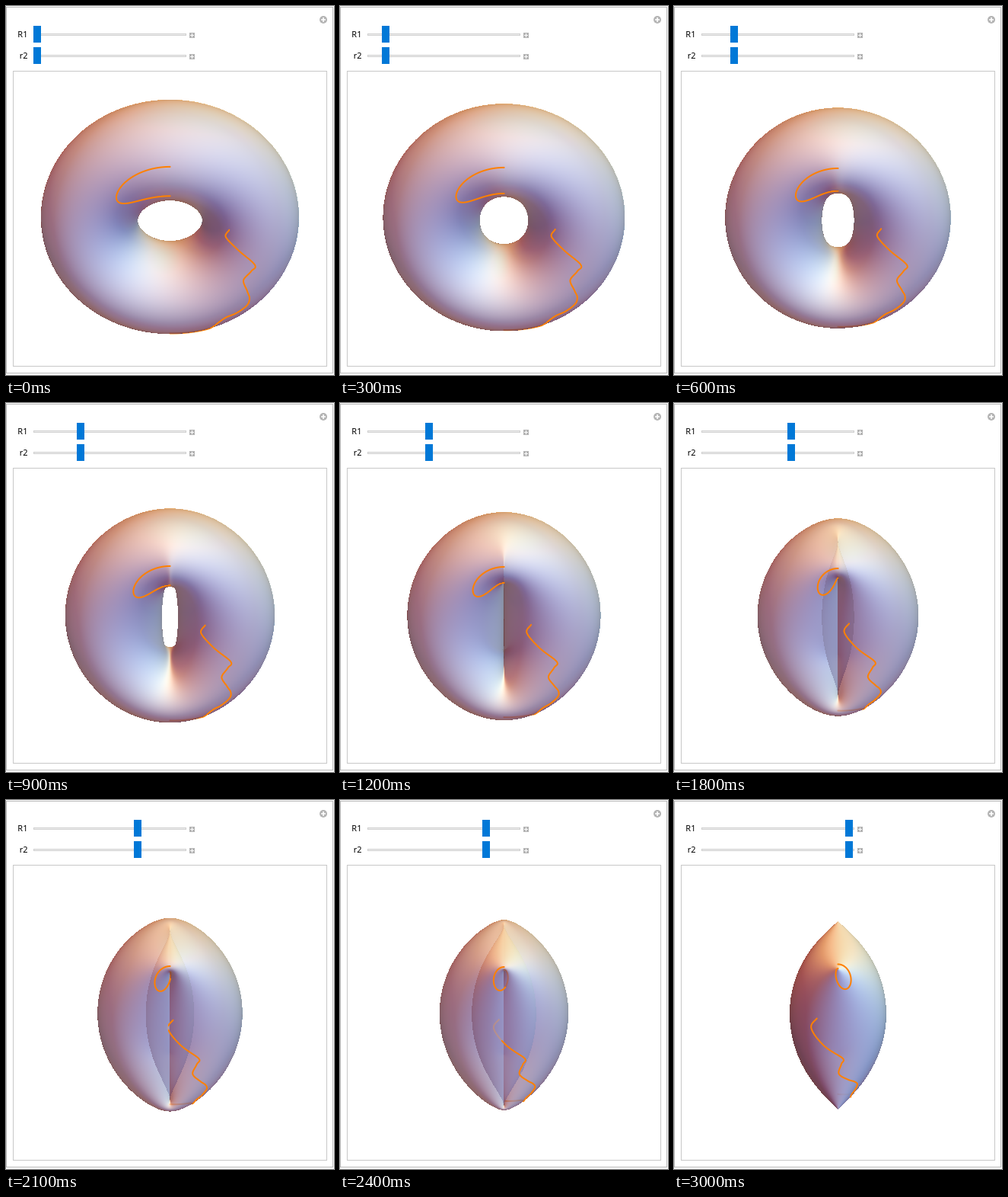
These frames come from a looping animation (431 px wide and 484 px high, 4 s). An HTML page with a canvas:

```html
<!DOCTYPE html>
<html lang="en">
<head>
<meta charset="utf-8">
<title>Torus deformation</title>
<style>
  html, body { margin: 0; width: 100%; height: 100%; overflow: hidden; background: #fff; }
  canvas, svg { position: absolute; left: 0; top: 0; }
  text { font: 11px "Noto Sans", "Open Sans", sans-serif; text-anchor: end; }
</style>
</head>
<body>
<canvas id="view" width="431" height="484"></canvas>
<svg width="431" height="484" shape-rendering="crispEdges">
  <defs>
    <g id="row">
      <rect x="36.5" y="36.5" width="200" height="2" fill="#eee" stroke="#d0d0d0"/>
      <rect x="241" y="35" width="7" height="7" fill="#b4b4b4"/>
      <path d="M242 38.5h5M244.5 36v5" stroke="#fff"/>
    </g>
  </defs>
  <rect x=".5" y="1.5" width="429" height="480" fill="none" stroke="#b8b8b8"/>
  <rect x="9.5" y="85.5" width="412" height="387" fill="none" stroke="#c8c8c8"/>
  <circle cx="417" cy="18" r="5" fill="#b4b4b4" shape-rendering="auto"/>
  <path d="M414 18h6M417 15v6" stroke="#fff" stroke-width="1.6" shape-rendering="auto"/>
  <use href="#row"/>
  <use href="#row" y="28"/>
  <text x="28.5" y="41">R1</text>
  <text x="28.5" y="69">r2</text>
  <g id="thumbs" fill="#0078d7">
    <rect x="36" y="26" width="10" height="22"/>
    <rect x="36" y="54" width="10" height="22"/>
  </g>
</svg>
<script>
const W = 431, H = 484, CX = 215.47, CY = 282.6, DIST = 1411;
const SIN = 0.85, COS = 0.527, RING = 105.6, TUBE = 63.4;
const STEPS = 10, STEP_MS = 300, LOOP_MS = 4000;
const OPACITY = 0.7, ORANGE = [255, 128, 0], RAD = Math.PI / 180;
const ctx = document.getElementById('view').getContext('2d');
const thumbs = document.getElementById('thumbs');

const unit = v => {
  const n = Math.hypot(...v) || 1;
  return v.map(c => c / n);
};
const AMBIENT = [0.4, 0.2, 0.2];
const LIGHTS = [
  [[2, 0, 2], [0, 0.18, 0.5]],
  [[2, 2, 3], [0.18, 0.5, 0.18]],
  [[0, 2, 2], [0.5, 0.18, 0]],
  [[0, 0, 2], [0, 0, 0.18]]
].map(([dir, color]) => [unit(dir), color]);

// Model axes to screen right, up and towards the viewer
const turn = ([x, y, z]) => [x, y * SIN - z * COS, y * COS + z * SIN];

function shade(normal) {
  const n = unit(turn(normal)), flip = n[2] < 0 ? -1 : 1;
  const rgb = AMBIENT.slice();
  for (const [d, color] of LIGHTS) {
    const dot = flip * (n[0] * d[0] + n[1] * d[1] + n[2] * d[2]);
    if (dot > 0) color.forEach((c, i) => rgb[i] += c * dot);
  }
  return rgb.map(c => 255 * Math.min(1, c));
}

// Both the ring's half width and the tube's depth shrink to zero
function surface(k) {
  const R1 = RING * (1 - k / STEPS), r2 = TUBE * (1 - k / STEPS);
  return (u, v, lit) => {
    const cu = Math.cos(u), su = Math.sin(u), cv = Math.cos(v), sv = Math.sin(v);
    const a = R1 + TUBE * cv, b = RING + r2 * cv;
    const [x, y, depth] = turn([a * cu, b * su, TUBE * sv]);
    const s = DIST / (DIST - depth);
    const p = { x: CX + x * s, y: CY - y * s, s };
    if (lit) p.rgb = shade([b * cu * TUBE * cv, a * su * TUBE * cv, sv * (a * su * r2 * su + b * cu * TUBE * cu)]);
    return p;
  };
}

function spline(pts, t) {
  const f = t * (pts.length - 1), i = Math.min(pts.length - 2, Math.floor(f)), q = f - i;
  const at = j => pts[Math.max(0, Math.min(pts.length - 1, j))];
  return [0, 1].map(c => {
    const [a, b, d, e] = [-1, 0, 1, 2].map(o => at(i + o)[c]);
    return b + q / 2 * (d - a + q * (2 * a - 5 * b + 4 * d - e + q * (3 * (b - d) + e - a)));
  });
}
const WAVE = [[17, 116], [8, 122.6], [-3.6, 107], [-13.7, 84.5], [-19, 86], [-27.8, 88.7],
  [-34.2, 75.7], [-38.4, 64.5], [-43.9, 56.3], [-51.3, 56], [-57, 59.8], [-62.5, 55.6],
  [-67.4, 46], [-71, 37], [-80, 31], [-90, 28]];
const CURVES = [
  t => [90 + 43.7 * Math.sin(Math.PI * t), 102.7 - 22.4 * Math.cos(Math.PI * t)],
  t => spline(WAVE, t)
];

function fillTriangle(layers, a, b, c) {
  const area = (b.x - a.x) * (c.y - a.y) - (b.y - a.y) * (c.x - a.x);
  if (!area) return;
  const x0 = Math.ceil(Math.min(a.x, b.x, c.x) - 0.5), x1 = Math.max(a.x, b.x, c.x);
  const y0 = Math.ceil(Math.min(a.y, b.y, c.y) - 0.5), y1 = Math.max(a.y, b.y, c.y);
  for (let j = y0; j + 0.5 < y1; j++) {
    for (let i = x0; i + 0.5 < x1; i++) {
      const px = i + 0.5, py = j + 0.5;
      const wa = ((b.x - px) * (c.y - py) - (b.y - py) * (c.x - px)) / area;
      const wb = ((c.x - px) * (a.y - py) - (c.y - py) * (a.x - px)) / area;
      const wc = 1 - wa - wb;
      if (wa < 0 || wb < 0 || wc < 0) continue;
      (layers[j * W + i] ||= []).push({
        s: wa * a.s + wb * b.s + wc * c.s,
        alpha: OPACITY,
        rgb: a.rgb.map((v, n) => wa * v + wb * b.rgb[n] + wc * c.rgb[n])
      });
    }
  }
}

function addCurve(layers, point, curve) {
  const marks = new Map(), N = 900;
  for (let n = 0; n <= N; n++) {
    const [u, v] = curve(n / N), p = point(u * RAD, v * RAD);
    for (let j = Math.floor(p.y) - 2; j <= p.y + 2; j++) {
      for (let i = Math.floor(p.x) - 2; i <= p.x + 2; i++) {
        const alpha = Math.min(1, 1.5 - Math.hypot(i + 0.5 - p.x, j + 0.5 - p.y));
        const key = j * W + i, old = marks.get(key);
        if (alpha > 0 && (!old || alpha > old.alpha)) marks.set(key, { s: p.s + 0.002, alpha, rgb: ORANGE });
      }
    }
  }
  marks.forEach((m, key) => (layers[key] ||= []).push(m));
}

function render(k) {
  const NU = 240, NV = 120, point = surface(k), layers = new Array(W * H);
  const grid = [];
  for (let i = 0; i <= NU; i++) {
    grid.push(Array.from({ length: NV + 1 }, (_, j) => point(i / NU * 2 * Math.PI, j / NV * 2 * Math.PI, true)));
  }
  for (let i = 0; i < NU; i++) {
    for (let j = 0; j < NV; j++) {
      const a = grid[i][j], b = grid[i + 1][j], c = grid[i + 1][j + 1], d = grid[i][j + 1];
      fillTriangle(layers, a, b, c);
      fillTriangle(layers, a, c, d);
    }
  }
  CURVES.forEach(curve => addCurve(layers, point, curve));

  const img = ctx.createImageData(W, H);
  img.data.fill(255);
  layers.forEach((list, key) => {
    const rgb = [255, 255, 255];
    list.sort((p, q) => p.s - q.s);
    for (const l of list) l.rgb.forEach((v, n) => rgb[n] += (v - rgb[n]) * l.alpha);
    img.data.set(rgb, key * 4);
  });
  return img;
}

const cache = [];
let shown = -1;
function tick(now) {
  const k = Math.min(STEPS, Math.floor(now % LOOP_MS / STEP_MS));
  if (k !== shown) {
    shown = k;
    ctx.putImageData(cache[k] ||= render(k), 0, 0);
    thumbs.setAttribute('transform', `translate(${Math.round(18.9 * k)} 0)`);
  }
  requestAnimationFrame(tick);
}
tick(performance.now());
</script>
</body>
</html>
```
